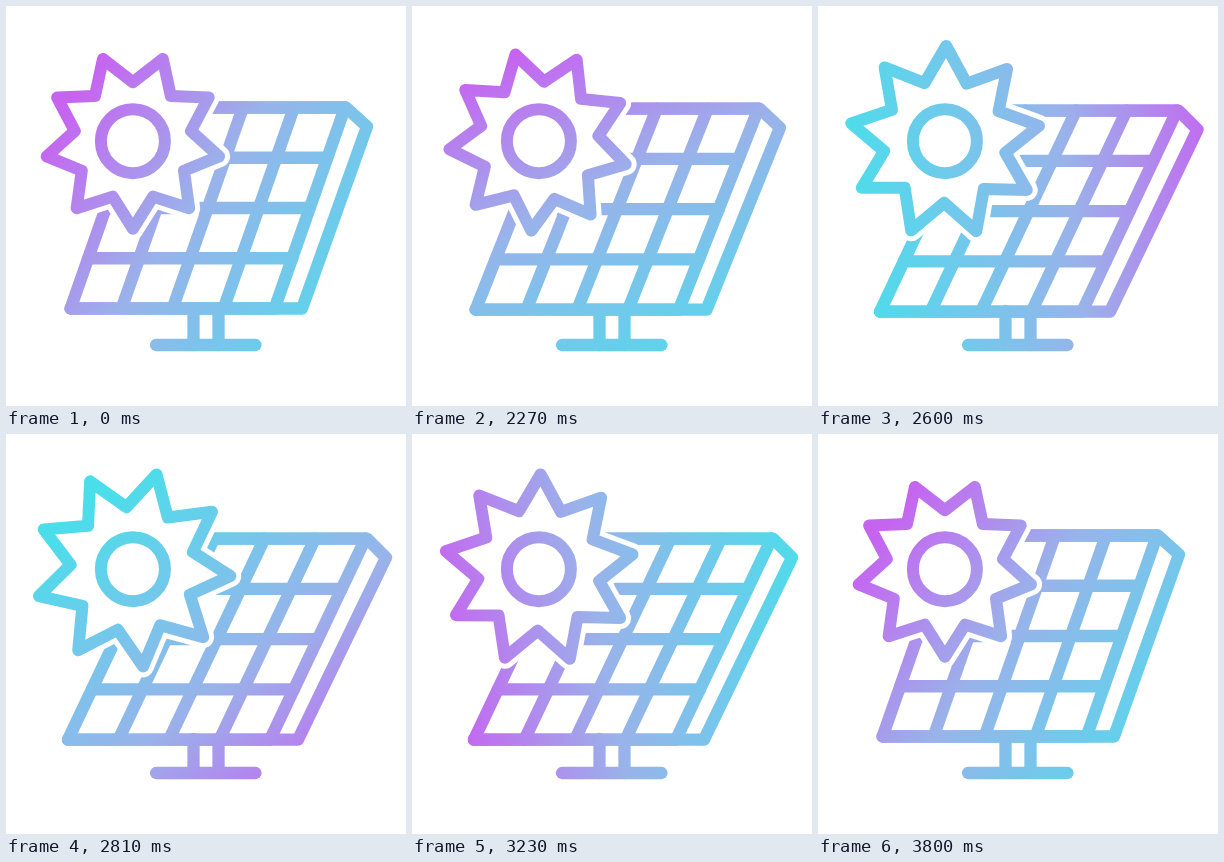
An HTML page with a canvas for the animation above (3830 ms loop, 400x400 px).

```html
<!DOCTYPE html>
<html>
<head>
<meta charset="utf-8">
<title>Solar panel</title>
<style>
html, body { margin: 0; width: 100%; height: 100%; overflow: hidden; background: #fff; }
canvas { display: block; width: 400px; height: 400px; }
</style>
</head>
<body>
<canvas id="stage" width="400" height="400"></canvas>
<script>
const ctx = document.getElementById('stage').getContext('2d');
const LOOP = 3830, HOLD = 2000, STEP = 30, MOVE = 1800;
const SUN = { x: 126.9, y: 135.2 };

// Gradient direction in degrees against progress
const TURN = [[0, 35], [0.15, 66], [0.333, 173], [0.45, 233], [0.683, 350], [1, 395]];

const mix = (a, b, k) => a + (b - a) * k;
const smooth = v => {
  const k = Math.min(1, Math.max(0, v));
  return k * k * (3 - 2 * k);
};

function slope(i) {
  if (i === 0 || i === TURN.length - 1) return 0;
  const [a, b] = [TURN[i - 1], TURN[i + 1]];
  return (b[1] - a[1]) / (b[0] - a[0]);
}

// Cubic Hermite through the turn keys
function turnAt(u) {
  let i = 0;
  while (i < TURN.length - 2 && u > TURN[i + 1][0]) i++;
  const [u0, a0] = TURN[i], [u1, a1] = TURN[i + 1];
  const w = u1 - u0, s = (u - u0) / w, r = 1 - s;
  return mix(a0, a1, smooth(s)) + w * s * r * (slope(i) * r - slope(i + 1) * s);
}

function gradient(u) {
  const a = turnAt(u) * Math.PI / 180;
  const dx = Math.cos(a) * 192, dy = Math.sin(a) * 192;
  const g = ctx.createLinearGradient(222 - dx, 205 - dy, 222 + dx, 205 + dy);
  g.addColorStop(0, '#c664f0');
  g.addColorStop(0.42, '#99b3ea');
  g.addColorStop(1, '#4adeeb');
  return g;
}

function line(...points) {
  ctx.beginPath();
  points.forEach(([x, y]) => ctx.lineTo(x, y));
  ctx.stroke();
}

function drawStand() {
  line([187.5, 305], [187.5, 339]);
  line([212.5, 305], [212.5, 339]);
  line([150, 339], [249.5, 339]);
}

function drawPanel(k) {
  const top = mix(101.5, 104.6, k), height = 201, bottom = top + height;
  const left = mix(64.6, 62, k), gap = mix(51, 50.5, k);
  const lean = mix(0.35, 0.475, k) * height;
  const corner = [mix(340, 361, k), top];
  for (let i = 0; i < 5; i++) {
    const f = i / 4;
    const x = left + gap * i;
    line([x, bottom], [x + lean, top]);
    const start = left + lean * (1 - f);
    line([start, top + height * f], [start + gap * 4, top + height * f]);
  }
  line([left + lean, top], corner, [mix(361, 380, k), top + 19],
    [mix(296, 292, k), bottom], [left, bottom]);
}

function drawSun(spin, grow, paint) {
  const outer = mix(87.5, 98, grow), inner = mix(59, 62.5, grow);
  ctx.beginPath();
  for (let i = 0; i < 18; i++) {
    const a = (90 + spin + i * 20) * Math.PI / 180;
    const r = i % 2 ? inner : outer;
    ctx.lineTo(SUN.x + r * Math.cos(a), SUN.y + r * Math.sin(a));
  }
  ctx.closePath();
  ctx.fillStyle = ctx.strokeStyle = '#fff';
  ctx.lineWidth = 22;
  ctx.fill();
  ctx.stroke();
  ctx.strokeStyle = paint;
  ctx.lineWidth = 12;
  ctx.stroke();
  ctx.beginPath();
  ctx.arc(SUN.x, SUN.y, 32, 0, Math.PI * 2);
  ctx.stroke();
}

function draw(time) {
  const moved = Math.max(0, time % LOOP - HOLD);
  const u = Math.min(1, Math.floor(moved / STEP) * STEP / MOVE);
  const tilt = smooth(u / 0.367) * smooth((1 - u) / 0.3);
  const grow = smooth(1 - Math.abs(2 * u - 1));
  const paint = gradient(u);

  ctx.fillStyle = '#fff';
  ctx.fillRect(0, 0, 400, 400);
  ctx.lineCap = ctx.lineJoin = 'round';
  ctx.lineWidth = 12.3;
  ctx.strokeStyle = paint;
  drawStand();
  drawPanel(tilt);
  drawSun(80 * smooth(u), grow, paint);
}

const begin = performance.now();
function tick() {
  draw(performance.now() - begin);
  requestAnimationFrame(tick);
}
tick();
</script>
</body>
</html>
```
